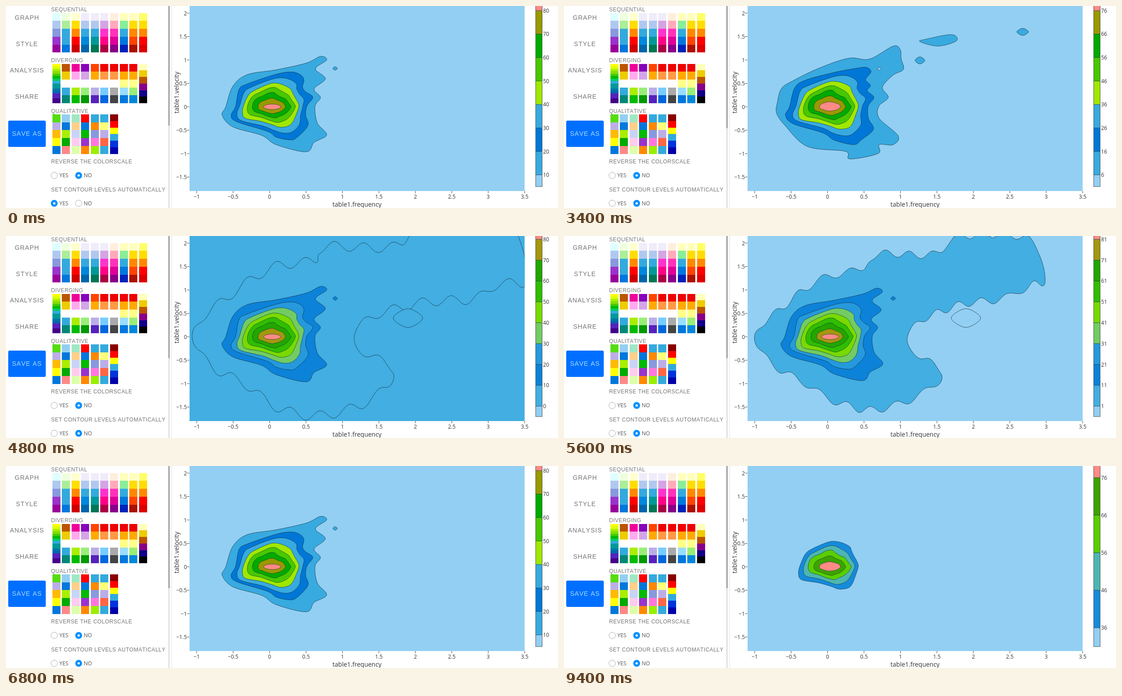
An HTML page for the animation above (10000 ms loop, 1236 by 453 pixels).

```html
<!DOCTYPE html>
<html lang="en">
<head>
<meta charset="utf-8">
<title>Contour levels</title>
<style>
html, body { margin: 0; width: 100%; height: 100%; overflow: hidden; background: #fff; }
svg { display: block; }
text { font: 12px "Open Sans", sans-serif; fill: #333; }
.nav, .head { font-family: "Liberation Sans", Arial, sans-serif; font-kerning: none; fill: #757575; }
.nav { font-size: 14px; letter-spacing: 1px; }
.head { letter-spacing: .53px; }
.title { font-size: 14px; }
.opt { fill: #555; }
.line { stroke: #142c3c; stroke-width: .75; stroke-linejoin: round; }
</style>
</head>
<body>
<svg width="1236" height="453" viewBox="0 0 1236 453">
  <clipPath id="area"><rect x="411" width="750.5" height="415"/></clipPath>
  <g id="panel"></g>
  <g id="axes"></g>
  <g id="plot" clip-path="url(#area)"></g>
  <g id="bar"></g>
  <g id="state"></g>
</svg>
<script>
const $ = id => document.getElementById(id);
const mix = (a, b, u) => a + u * (b - a);
const rect = (x, y, w, h, fill, more = '') =>
  `<rect x="${x}" y="${y}" width="${w}" height="${h}" fill="${fill}" ${more}/>`;
const text = (x, y, s, cls = '', anchor = 'start', more = '') =>
  `<text x="${x}" y="${y}" class="${cls}" text-anchor="${anchor}" ${more}>${s}</text>`;

// ---- key outlines: each starts at its left end and runs clockwise ----
const CENTRE = 226, SAMPLES = 400;
const points = s => s.split(' ').map(p => p.split(',').map(Number));

// Closed Catmull-Rom curve, sampled evenly by control point so that outlines blend
function curve(pts, samples = SAMPLES) {
  const n = pts.length;
  return Array.from({ length: samples }, (_, k) => {
    const at = k * n / samples, i = Math.floor(at), u = at - i;
    const [a, b, c, d] = [-1, 0, 1, 2].map(o => pts[(i + o + n) % n]);
    return [0, 1].map(j => b[j] + .5 * u * (c[j] - a[j] +
      u * (2 * a[j] - 5 * b[j] + 4 * c[j] - d[j] +
      u * (3 * (b[j] - c[j]) + d[j] - a[j]))));
  });
}

// The faint outermost line waves outwards on every second grid column
const ripple = ([x, y]) => [x, y + 11 * Math.cos(2 * Math.PI * (x - 605) / 65.3) *
  Math.max(-1, Math.min(1, (y - CENTRE) / 60))];

const ellipse = (cx, cy, rx, ry, n = 20) => Array.from({ length: n }, (_, i) => {
  const a = Math.PI * (1 + 2 * i / n);
  return [cx + rx * Math.cos(a), cy + ry * Math.sin(a)];
});

const diamond = (x, y, rx, ry = rx) => curve(ellipse(x, y, rx, ry, 4), 40);

const shapes = [
  { level: 0, holes: [diamond(900, 184, 33, 21)],
    line: curve(points('418,215 508,128 600,70 690,55 715,24 870,24 930,-25 1125,-25 1165,95 1100,108 ' +
      '1050,140 930,150 803,190 785,250 868,300 815,368 700,403 605,383 540,335 460,290')).map(ripple) },
  { level: 4, islands: [diamond(1024, 58, 27, 15), diamond(883, 121, 28, 10),
      curve(points('787,79 803,68 840,69 868,47 930,58 949,78 933,89 905,69 868,86 820,101'))],
    line: curve(points('454,246 471,228 480,198 540,152 605,122 672,89 703,92 737,79 758,96 800,105 820,104 ' +
      '835,142 772,143 735,166 738,210 732,255 770,288 778,331 705,341 640,355 622,334 575,330 522,306 480,268')) },
  { level: 6, islands: [diamond(797, 122, 11, 8), diamond(1027, 58, 13, 8),
      curve(points('797,80 812,74 868,64 879,78 838,90'))],
    holes: [diamond(706, 141, 4, 3)],
    line: curve(points('476,240 478,215 487,185 512,168 572,139 638,117 684,119 737,90 753,98 755,118 760,142 ' +
      '737,155 713,182 726,205 705,225 706,252 748,291 737,311 706,311 703,331 640,343 630,326 545,315 495,268')) },
  { level: 10, islands: [diamond(737, 140, 5, 4)],
    line: curve(points('484,245 492,226 508,180 540,154 605,143 672,128 704,113 718,121 693,141 715,163 ' +
      '690,186 704,205 692,225 697,262 718,289 690,306 672,327 605,311 572,290 508,271')) },
  { level: 20, line: curve(points('504,246 514,225 522,187 540,175 605,153 640,148 659,154 667,165 664,181 667,188 ' +
      '672,193 687,205 674,224 671,245 676,268 650,296 633,300 605,294 585,281 518,260')) },
  { level: 36, line: curve(points('525,240 529,222 540,198 555,186 590,171 607,169 625,173 640,181 643,188 646,195 ' +
      '650,203 655,212 659,225 653,245 645,265 635,274 615,276 598,270 570,262 532,255')) },
  { level: 56, line: curve(points('547,230 549,215 558,204 572,198 588,190 601,189 608,195 618,201 628,205 633,211 ' +
      '638,218 642,223 643,227 636,238 626,246 615,251 605,255 588,251 570,244 553,239')) },
  { level: 80, line: curve(ellipse(596, CENTRE, 19, 6)) }
];

function contour(level) {
  const i = Math.max(1, shapes.findIndex(s => s.level >= Math.min(level, 80)));
  const a = shapes[i - 1], b = shapes[i];
  const u = Math.min(1, (level - a.level) / (b.level - a.level));
  const { islands = [], holes = [] } = u < .6 ? a : b;
  const line = a.line.map((p, k) => p.map((v, j) => mix(v, b.line[k][j], u)));
  return { solid: [line, ...islands], holes };
}

const path = (pts, fill) => `<path class="line" fill="${fill}" d="M${
  pts.map(p => p.map(v => v.toFixed(1)).join()).join('L')}Z"/>`;

// ---- plot and colour bar ----
const STOPS = '93cff3 38aadf 0077d6 38aadf a0e800 47c800 00aa00 999900 ff8a86'.split(' ')
  .map(c => [0, 2, 4].map(k => parseInt(c.slice(k, k + 2), 16)));

function scale(u) {
  const at = u * (STOPS.length - 1), i = Math.min(STOPS.length - 2, Math.floor(at));
  return `rgb(${STOPS[i].map((v, k) => Math.round(mix(v, STOPS[i + 1][k], at - i)))})`;
}

const LAST = 82, BAR_BOTTOM = 405, BAR_LENGTH = 421;

function drawPlot(start) {
  const count = Math.floor((LAST - start) / 10) + 1;
  const step = BAR_LENGTH / count;
  const fill = i => scale(i / count);
  const ground = start ? 0 : 1; // nothing lies below zero
  let plot = rect(411, 0, 750.5, 415, fill(ground));
  let bar = rect(1186, BAR_BOTTOM - step / 2, 14.5, step / 2, fill(0));
  for (let i = 0; i < count; i++) {
    const { solid, holes } = contour(start + i * 10);
    const y = BAR_BOTTOM - step * (i + .5);
    plot += solid.map(p => path(p, fill(i + 1))).join('') +
      holes.map(p => path(p, fill(ground))).join('');
    bar += rect(1186, y - step, 14.5, step, fill(i + 1)) +
      `<path class="line" d="M1186 ${y}h14.5"/>` + text(1202.5, y + 4.5, start + i * 10);
  }
  $('plot').innerHTML = plot;
  $('bar').innerHTML = bar + rect(1186, -20, 14.5, BAR_BOTTOM + 20, 'none', 'stroke="#444" stroke-width=".9"');
}

function drawAxes() {
  let out = '';
  const label = v => String(v).replace('-', '−');
  for (let v = -1; v <= 3.5; v += .5) {
    const x = 590.2 + 163.2 * v;
    out += rect(x - .5, 415, 1, 5, '#444') + text(x, 432, label(v), '', 'middle');
  }
  for (let v = -1.5; v <= 2; v += .5) {
    const y = CENTRE - 105 * v;
    out += rect(405.5, y - .5, 5, 1, '#444') + text(405, y + 4.8, label(v), '', 'end');
  }
  $('axes').innerHTML = out + text(786, 449.5, 'table1.frequency', 'title', 'middle') +
    text(0, 0, 'table1.velocity', 'title', 'middle', 'transform="translate(387 194) rotate(-90)"');
}

// ---- side panel ----
function swatches(top, columns) {
  return columns.split('|').map((col, i) => {
    const cells = col.split(' '), h = 88.5 / cells.length, x = Math.floor(104.2 + 21.55 * i);
    return cells.map((c, j) => c === '-' ? '' :
      rect(x, top + h * j, 18, h + .1, '#' + c, 'shape-rendering="crispEdges"')).join('');
  }).join('');
}

function drawPanel() {
  const nav = ['GRAPH', 'STYLE', 'ANALYSIS', 'SHARE'];
  const heads = [['SEQUENTIAL', 11.5], ['DIVERGING', 125.5], ['QUALITATIVE', 239.5],
    ['REVERSE THE COLORSCALE', 353], ['SET CONTOUR LEVELS AUTOMATICALLY', 416]];
  $('panel').innerHTML =
    nav.map((s, i) => text(47, 31.3 + 58.8 * i, s, 'nav', 'middle')).join('') +
    rect(5, 257, 84, 59, '#006fff', 'rx="3"') +
    text(47, 291, 'SAVE AS', 'nav', 'middle', 'style="fill:#a8dcff"') +
    heads.map(([s, y]) => text(101, y, s, 'head')).join('') +
    swatches(15.7, 'dff b0c8f0 89d 93c 909|efd ae9 3ad 3ad 07d|ffc fd0 f80 f00 c00|' +
      'f0ecfa b0c8f0 3ad 08d 06a|f0ecfa b0c8f0 3ad 099 075|f0ecfa d4a4e4 f3c f08 a04|' +
      'fed fab f3b d09 808|ffb 8e9 3ad 07d 02b|ffb fd0 f80 f40 a10|ff6 fd0 f80 f00 d00') +
    swatches(129.5, 'ff0 df0 ae0 8d0 4c0 0b0 0c6 3ad 099 099 07a 06a 52b 52b 408 408|' +
      'b50 ec0 - 3ad 087|e09 fae - ae0 0b0|80b d4a4e8 - 9e7 090|f40 fa0 - bbaee8 52b|' +
      'e00 f94 - 7cf 06d|e00 f94 - aaa 444|e00 fa0 ff8 9df 07d|e00 fa0 ff8 9e7 08d|' +
      'ffb ec0 b50 808 108 000') +
    swatches(243, '5d1 bbaee8 fb0 ff0 07d|93cff3 07d ae0 0a0 f88|a0e8c4 ffd08a c8d4f5 fce dfa|' +
      'f00 07d 0b0 93c f80|3ad f80 89d f7d 9e0|3ad ff7 bbaee8 f64 3ad|800 f00 ff0 3ad 03d 00a') +
    rect(364, 0, 2, 453, '#d4d4d4') + rect(370.5, 0, 1, 453, '#e2e2e2') +
    [380, 442.5].map(y => text(119.5, y + 4.4, 'YES', 'opt') + text(174, y + 4.4, 'NO', 'opt')).join('');
}

const radio = (x, y, on) => on
  ? `<circle cx="${x}" cy="${y}" r="7.7" fill="#0090ff"/><circle cx="${x}" cy="${y}" r="2.6" fill="#fff"/>`
  : `<circle cx="${x}" cy="${y}" r="7.2" fill="#fff" stroke="#aaa"/>`;

function drawState(auto, thumb) {
  $('state').innerHTML = radio(108, 380, false) + radio(162.7, 380, true) +
    radio(108, 442.5, auto) + radio(162.7, 442.5, !auto) + rect(364, 0, 2, thumb, '#777');
}

// ---- timeline ----
const LOOP = 10000, STEP = 200;
const drags = [{ at: 2800, from: 9, to: 8 }, { at: 3400, from: 6, to: 4 }, { at: 4200, from: 3, to: 0 }];
const RISE = 5600, RISE_STEPS = 19;

function startLevel(t) {
  const steps = from => Math.floor((t - from) / STEP);
  if (t >= RISE) {
    const k = Math.min(RISE_STEPS, steps(RISE));
    return Math.round(1 + 1.5 * k + Math.max(0, k - 13)); // faster towards the end
  }
  const drag = drags.filter(d => t >= d.at).pop();
  return drag ? Math.max(drag.to, drag.from - steps(drag.at)) : 10;
}

let shownLevel, shownState;
function tick() {
  const t = performance.now() % LOOP;
  const level = startLevel(t), state = (t >= 800) + (t >= 1400);
  if (level !== shownLevel) drawPlot(shownLevel = level);
  if (state !== shownState) {
    shownState = state;
    drawState(state === 0, state === 2 ? 274 : 268);
  }
  requestAnimationFrame(tick);
}

drawPanel();
drawAxes();
tick();
</script>
</body>
</html>
```
